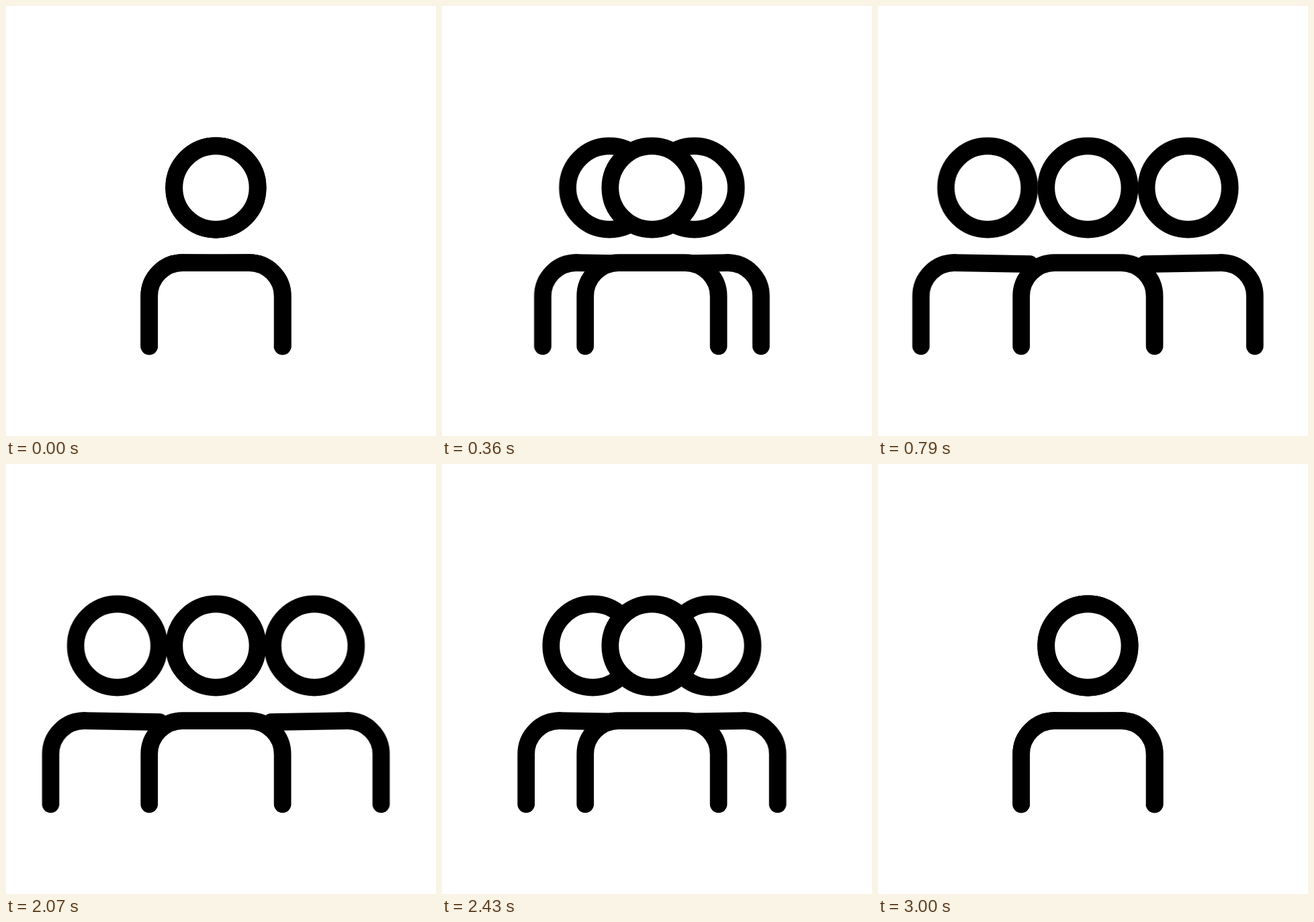
These frames come from a looping animation (640x640 px, 3.57 s). An HTML page without scripts:

```html
<!DOCTYPE html>
<html lang="en">
<head>
<meta charset="utf-8">
<title>One becomes three</title>
<style>
  html, body { margin: 0; width: 100%; height: 100%; overflow: hidden; background: #fff; }
  svg { display: block; width: 100%; height: 100%; }
  .ink { fill: none; stroke: #000; stroke-width: 25.7; stroke-linecap: round; stroke-linejoin: round; }
  .front { fill: #fff; }
  .side { animation: slide 3570ms -4ms step-end infinite; }

  /* Stepped at 14 pictures per second: ease out, rest, ease back */
  @keyframes slide {
    0% { transform: translateX(0); }
    2% { transform: translateX(-1px); }
    4% { transform: translateX(-8.9px); }
    6% { transform: translateX(-23.1px); }
    8% { transform: translateX(-41.9px); }
    10% { transform: translateX(-63.3px); }
    12% { transform: translateX(-85.7px); }
    14% { transform: translateX(-107.2px); }
    16% { transform: translateX(-126px); }
    18% { transform: translateX(-140.3px); }
    20% { transform: translateX(-148.3px); }
    22% { transform: translateX(-149.3px); }
    58% { transform: translateX(-146.7px); }
    60% { transform: translateX(-140.7px); }
    62% { transform: translateX(-131.7px); }
    64% { transform: translateX(-120px); }
    66% { transform: translateX(-105.2px); }
    68% { transform: translateX(-88px); }
    70% { transform: translateX(-69.8px); }
    72% { transform: translateX(-52.4px); }
    74% { transform: translateX(-38.8px); }
    76% { transform: translateX(-28px); }
    78% { transform: translateX(-18px); }
    80% { transform: translateX(-9.5px); }
    82% { transform: translateX(-3.2px); }
    84%, 100% { transform: translateX(0); }
  }
</style>
</head>
<body>
<svg viewBox="0 0 640 640">
  <defs>
    <circle id="head" cx="312.4" cy="270.5" r="62.1"/>
    <path id="arm" d="M213.2 506.3V432A49.6 49.6 0 0 1 262.8 382.2"/>
  </defs>

  <g class="ink">
    <g class="side">
      <use href="#head"/>
      <use href="#arm"/>
      <path d="M262.8 382.2L375.2 384.2"/>
    </g>
    <g transform="translate(624.8 0) scale(-1 1)">
      <g class="side">
        <use href="#head"/>
        <use href="#arm"/>
        <path d="M262.8 382.2L377 384.2"/>
      </g>
    </g>
    <g class="front">
      <use href="#head"/>
      <path d="M213.2 506.3V432A49.6 49.6 0 0 1 262.8 382.2H362A49.6 49.6 0 0 1 411.6 432V506.3"/>
    </g>
  </g>
</svg>
</body>
</html>
```
